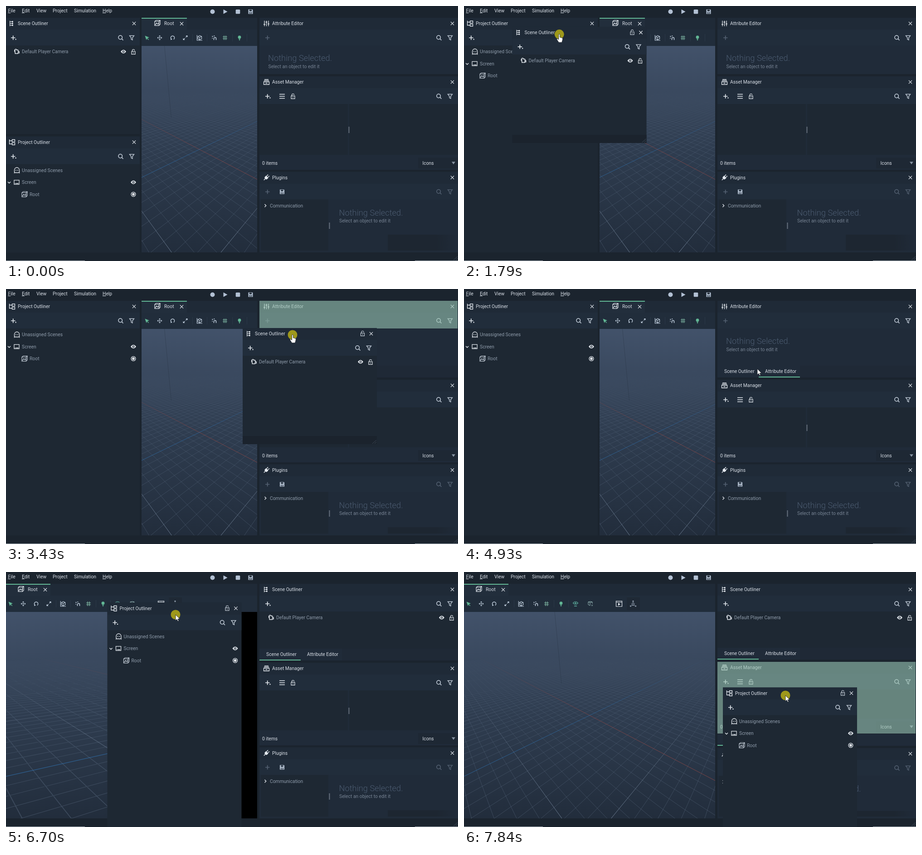
These frames come from a looping animation (997x562 px, 8 s). An HTML page:

```html
<!DOCTYPE html>
<html lang="en">
<head>
<meta charset="utf-8">
<title>Dockable panels</title>
<style>
html, body { margin: 0; width: 100%; height: 100%; overflow: hidden; background: #1b242e; }
#stage { display: block; position: absolute; left: 0; top: 0; }
text { font: 10.33px Roboto, sans-serif; fill: #d9dfe7; white-space: pre; }
text.dim { fill: #8f9cab; }
text.big { font-size: 18.3px; font-weight: 300; fill: #4b5b70; }
text.sub { fill: #768393; }
.u { text-decoration: underline; }
.i { fill: none; stroke: currentColor; stroke-width: 1.2; }
.f { fill: currentColor; stroke: none; }
</style>
</head>
<body>
<svg id="stage" width="997" height="562" viewBox="0 0 997 562">
  <defs>
    <linearGradient id="sky" x1="0" y1="0" x2="0" y2="1">
      <stop offset="0" stop-color="#42526a"/>
      <stop offset=".5" stop-color="#2f3d50"/>
      <stop offset="1" stop-color="#222d3c"/>
    </linearGradient>
    <linearGradient id="patch">
      <stop offset="0" stop-color="#1d2631"/>
      <stop offset=".7" stop-color="#1d2631"/>
      <stop offset="1" stop-color="#202b39"/>
    </linearGradient>
    <g id="grid" fill="none"></g>
  </defs>
  <g id="view"></g>
</svg>
<script>
const LOOP = 8000;
const BG = '#1b242e', TITLE = '#1f2a37', BAR = '#212d3b', BODY = '#1e2833', PANE = '#202b39';
const GREEN = '#62b795', PALE = '#b3c1d4', WHITE = '#e4e9ef', FAINT = '#566374';

const ICONS = {
  x: '<path d="M-3.6-3.6l7.2 7.2M3.6-3.6l-7.2 7.2"/>',
  plus: '<path stroke-width="1.7" d="M-5.5 0H4M-.8-4.7V4.7"/>',
  add: '<path stroke-width="1.7" d="M-5.5 0H4M-.8-4.7V4.7"/><path class="f" d="M3.8 2.5h2.4v2H3.8z"/>',
  search: '<circle cx="-.8" cy="-.8" r="4.2" stroke-width="1.5"/><path stroke-width="1.6" d="M2.3 2.3L5.5 5.5"/>',
  filter: '<path stroke-width="1.3" d="M-5-4.7H5L1.4 0V5L-1.4 3.4V0z"/>',
  scene: '<path d="M-3.3-6V6M-3.3-4H1M-3.3 0H1M-3.3 4H1"/><path class="f" d="M.8-5.4h2.8v2.8H.8zM.8-1.4h2.8v2.8H.8zM.8 2.6h2.8v2.8H.8z"/>',
  project: '<path d="M-6-6V4H0M-6-3H0M0-5.5H6v4.6H0zM0 1.4H6V6H0z" stroke-width="1.3"/>',
  sliders: '<path stroke-width="1.3" d="M-4.5-6V6M0-6V6M4.5-6V6M-6.5 2h4M-2-3h4M2.5 1h4"/>',
  box: '<path stroke-width="1.3" d="M-4.5-5.5h9M-5.5-3h11M-6-.5H6V5.5H-6zM-2 2.5H2"/>',
  plug: '<g transform="rotate(45)"><path class="f" d="M-3.5-2.5h7V1Q3.5 4 0 4T-3.5 1z"/><path stroke-width="1.5" d="M-2-7v4M2-7v4M0 4v4"/></g>',
  save: '<path class="f" d="M-5-5H4L5-4V5H-5zM-2.8-4.2v3H2.6v-3zM-3 1v3.2H3V1z" fill-rule="evenodd"/><path stroke-width=".9" d="M-2 2H2M-2 3.4H2"/>',
  list: '<path stroke-width="1.3" d="M-6-4.5H6M-6 0H6M-6 4.5H6"/>',
  lock: '<path d="M-4-.9H4V5.3H-4zM-2.5-1V-3a2.5 2.5 0 0 1 5 0M0 1.2v2"/>',
  eye: '<path class="f" d="M-6 0Q0-8 6 0 0 8-6 0z"/><circle r="2.5" fill="#1e2833" stroke="none"/><circle r="1.2" class="f"/>',
  camera: '<path stroke-width="1.5" d="M-3.8 4.2V1.4L-5.2 0V-2.6L-3-1.2a2.1 2.1 0 1 1 2.6-1.6 2 2 0 1 1 2.2 3L5-.2V3.2L2.4 2.4V4.2z"/>',
  ghost: '<path stroke-width="1.3" d="M-5.5 6V-.5a5.5 5.5 0 0 1 11 0V6L3.6 4.6 1.8 6 0 4.6-1.8 6-3.6 4.6z"/><path class="f" d="M-2.7-1h1.5v2h-1.5zM1.2-1h1.5v2H1.2z"/>',
  screen: '<path d="M-5.6-4.6H5.6V4.6H-5.6z"/><path class="f" d="M-4 2h1.6v1.5H-4zM-1.6 2H4v1.5h-5.6z"/>',
  root: '<path d="M-6-3.5L-3-6H6V3L3.4 5.6H-6zM-6-3.5H3.4V5.6M3.4-3.5L6-6M-5 4l3.3-4L.5 2.4 3 .2"/>',
  radio: '<circle r="4.9" stroke-width="1.3"/><circle r="2.9" class="f"/>',
  open: '<path stroke-width="1.4" d="M-3-1.5L0 1.6 3-1.5"/>',
  shut: '<path stroke-width="1.4" d="M-1.5-3.2L1.7 0-1.5 3.2"/>',
  drop: '<path class="f" d="M-4-2.8H4L0 3z"/>',
  dots: '<path stroke-width="2" stroke-dasharray="1 1" d="M0-7V7"/>',
  play: '<path class="f" d="M-4-5L5 0-4 5z"/>',
  stop: '<rect class="f" x="-4.8" y="-4.8" width="9.6" height="9.6" rx="1.5"/>',
  disc: '<circle class="f" r="5"/>',
  pick: '<path class="f" d="M-4.5-4.5L5-.8 1 .8 4.2 4.2 3.2 5 0 1.7-1.4 5z"/>',
  move: '<path d="M0-2.4V2.4M-2.4 0H2.4" stroke-width="1"/><path class="f" d="M0-5.5L2.2-3H-2.2zM0 5.5L2.2 3H-2.2zM-5.5 0L-3-2.2V2.2zM5.5 0L3-2.2V2.2z"/>',
  rotate: '<path stroke-width="1.4" d="M-2 3.6A4.1 4.1 0 1 1 2.2 3.5"/><path class="f" d="M-4.4 5l.6-3.8 3 2.4z"/>',
  scale: '<path d="M1 -1L4-4M-1 1L-4 4"/><path class="f" d="M5-5V-1L1-5zM-5 5V1L-1 5z"/>',
  cube: '<path d="M-5.7-6V5.7H6M0-5L4.6-2.8V2.4L0 4.6-3.8 2.4V-2.8zM-3.8-2.8L0-.8 4.6-2.8M0-.8V4.6" stroke-width="1.1"/>',
  snap: '<path stroke-width="1.5" d="M-1 5V1.8a2.5 2.5 0 0 1 5 0V5"/><path class="f" d="M-5-4h2v2h-2zM-1-5h1.6v2H-1zM-5 .2h1.6v1.6H-5z"/>',
  hash: '<path stroke-width="1.1" d="M-2-5V5M2-5V5M-5-2H5M-5 2H5"/>',
  bulb: '<circle class="f" cy="-1.3" r="3.4"/><path stroke-width="1.6" d="M-1.5 3.2h3M-1 5h2"/>',
  look: '<path d="M-5.5-1.5Q0-8 5.5-1.5 0 4.5-5.5-1.5z"/><circle class="f" cy="-1.5" r="1.7"/><path stroke-width="1.6" d="M-3 5H3"/>',
  hide: '<path d="M-5-4L0-5 4-4V0M-5-4V2L-1 4V-2.5L4-4M-5-4L-1-2.5M2 2l3 3M5 2L2 5" stroke-width="1"/>',
  show: '<path d="M-6.5-6H6.5V6H-6.5zM-6.5-3.5H6.5"/><path class="f" d="M-2-2L3 1-2 4z"/>',
  nodes: '<path d="M0-3V1M0 2L-4.5 5M0 2L4.5 5M0-2.6L2.8-.8V2.2L0 3.8-2.8 2.2V-.8z" stroke-width="1"/><path class="f" d="M-1.4-7h2.8v3h-2.8zM-7 3.8h2.6v2.6H-7zM4.4 3.8H7v2.6H4.4z"/>'
};

const rect = (x, y, w, h, fill, more = '') =>
  `<rect x="${x}" y="${y}" width="${w}" height="${h}" fill="${fill}" ${more}/>`;
const icon = (name, x, y, color = WHITE) =>
  `<g class="i" color="${color}" transform="translate(${x} ${y})">${ICONS[name]}</g>`;
const text = (x, y, s, cls = '') => `<text x="${x}" y="${y + 3.7}" class="${cls}">${s}</text>`;
const at = (x, y, s) => `<g transform="translate(${x} ${y})">${s}</g>`;
const grip = (x, y) => `<path d="M${x - 9} ${y}l9-8M${x - 4} ${y}l4-4" stroke="#3c4856" fill="none"/>`;

// Ground grid seen from a camera pitched 30 degrees, 20 units away.
function buildGrid() {
  const project = (a, b) => {
    const z = 20 + .866 * b;
    return (325 * a / z).toFixed(1) + ' ' + (-163 * b / z).toFixed(1);
  };
  const line = (k, [pa, pb], [da, db]) => {
    const s = (-16.2 - k * pb) / db, e = s + 300;
    return `M${project(k * pa + s * da, k * pb + s * db)}L${project(k * pa + e * da, k * pb + e * db)}`;
  };
  const red = [[-.719, -.695], [-.695, .719]], blue = [[.695, -.719], [.719, .695]];
  let minor = '', major = '';
  for (let k = -60; k <= 20; k++) {
    if (!k) continue;
    const d = line(k, ...red) + line(k, ...blue);
    if (k % 10) minor += d; else major += d;
  }
  const fade = (id, color, mid, low) =>
    `<linearGradient id="${id}" gradientUnits="userSpaceOnUse" x1="0" y1="-130" x2="0" y2="227">
      <stop offset="0" stop-color="${color}" stop-opacity="0"/>
      <stop offset=".36" stop-color="${color}" stop-opacity="${mid}"/>
      <stop offset="1" stop-color="${color}" stop-opacity="${low}"/></linearGradient>`;
  const path = (id, d) => `<path d="${d}" stroke="url(#${id})"/>`;
  document.getElementById('grid').innerHTML =
    fade('minor', '#7f93ad', .17, .27) + fade('major', '#93a6be', .19, .65) +
    fade('redAxis', '#a04a45', .6, .75) + fade('blueAxis', '#2f74b5', .6, .75) +
    path('minor', minor) + path('major', major) +
    path('redAxis', line(0, ...red)) + path('blueAxis', line(0, ...blue)) +
    '<path d="M-77-228L-62-70" stroke="#1f2936" stroke-opacity=".3"/>';
}

function head(name, title, w, { float, plus = 'add', dim } = {}) {
  const tool = dim ? FAINT : '#cbd5e1', left = float ? -1 : -2;
  return rect(left, 0, w - left, 26, TITLE) + rect(left, 26, w - left, 35, BAR) +
    icon(name, name === 'scene' ? 12 : 13.5, 12.5) + text(26, 12.5, title) +
    icon('x', w - 12.5, 12.5) + (float ? icon('lock', w - 31.5, 12, '#c3ccd6') : '') +
    icon(plus, 16.5, 44, plus === 'add' ? WHITE : FAINT) +
    icon('search', w - 42, 44, tool) + icon('filter', w - 17.5, 44, tool);
}

const body = (w, h, float) => float ? rect(-1, 0, w + 1, h, BODY) : rect(-2, 0, w + 2, h, BODY);

function scene(w, h, float) {
  return body(w, h, float) + head('scene', 'Scene Outliner', w, { float }) +
    icon('camera', 24, 74.5) + text(35, 74.5, 'Default Player Camera', 'dim') +
    icon('eye', w - 36, 74.5) + icon('lock', w - 14, 75) +
    (float ? rect(-1, h - 18, w + 1, 18, '#1b232d') + grip(w - 1, h - 1) : '');
}

function project(w, h, float) {
  return body(w, h, float) + head('project', 'Project Outliner', w, { float }) +
    icon('ghost', 24, 74.5) + text(35, 74.5, 'Unassigned Scenes', 'dim') +
    icon('open', 7, 101.5) + icon('screen', 23.5, 101) + text(35, 101, 'Screen', 'dim') +
    icon('eye', w - 14, 101) +
    icon('root', 41, 127.5, '#c0c9d4') + text(52, 127.5, 'Root', 'dim') + icon('radio', w - 14, 127.5);
}

const nothing = (x, y) =>
  `<text x="${x - .5}" y="${y + 6}" class="big">Nothing Selected.</text>` + text(x, y + 17.8, 'Select an object to edit it', 'sub');

const attributes = (w, h) => rect(-2, 0, w + 2, h, PANE) +
  head('sliders', 'Attribute Editor', w, { plus: 'plus' }) + nothing(17.5, 89);

function assets(w, h) {
  const list = h - 94, foot = h - 15;
  return rect(-2, 0, w + 2, h, PANE) + head('box', 'Asset Manager', w) +
    icon('list', 48, 44) + icon('lock', 72, 44) +
    rect(-2, 61, 195, list, BODY) + rect(196, 61, w - 196, list, BODY) +
    icon('dots', 195.5, 62.5 + list / 2, '#aab4c0') +
    text(4, foot, '0 items') + rect(348, foot - 12, w - 348, 24, '#1e2834') +
    text(357.5, foot, 'Icons') + icon('drop', 426, foot, '#8793a2');
}

function plugins(w, y) {
  const end = 539 - y;
  return rect(-2, 0, w + 2, 543 - y, PANE) + head('plug', 'Plugins', w, { plus: 'plus', dim: true }) +
    icon('save', 48, 44, '#b9c6d6') + rect(1, 61, 149, end - 61, BODY) +
    icon('shut', 11, 74.5) + text(21, 74.5, 'Communication', 'dim') +
    icon('dots', 152.5, 61 + (543 - y - 61) / 2, '#aab4c0') + nothing(174, 90) +
    rect(281, 138.5, 154, end - 138.5, 'url(#patch)');
}

function viewport(wide, stretched) {
  const x = wide ? 0 : 299, w = 554 - x, ox = wide ? 0 : 2;
  const tools = [['pick', 10, GREEN], ['move', 38], ['rotate', 66.5], ['scale', 94.5], ['cube', 126],
    ['snap', 158.5], ['hash', 182, '#86c2ac'], ['bulb', 214, GREEN]];
  if (wide) tools.push(['look', 246, '#5aa89a'], ['hide', 279, '#8fb0b0'], ['show', 342, WHITE]);
  const bar = rect(0, 0, w, 26, '#1f2a37') + rect(0, 26, w, 36, BAR) + at(ox, 0,
    rect(-2, 0, 100, 26, '#222e3c') + rect(-2, 0, 100, 2, GREEN) +
    icon('root', 33, 11.5) + text(48, 12.5, 'Root') + icon('x', 86.5, 13) +
    [110, 142, 198, 230].map(s => rect(s, 36, 1, 16, '#2a3747')).join('') +
    (wide ? rect(359, 30, 29, 28, '#1f2935') + icon('nodes', 373, 44, '#8e9bab') : '') +
    tools.map(([n, tx, c = '#c2d0df']) => icon(n, tx, 44, c)).join(''));
  const place = stretched ? 'scale(2.17 1) translate(277 228)' : `translate(${w / 2} 228)`;
  return `<svg x="${x}" y="26" width="${w}" height="517">${bar}
    <svg y="62" width="${w}" height="455">${rect(0, 0, w, 455, 'url(#sky)')}
    <use href="#grid" transform="${place}"/>${stretched ? rect(500, 0, 54, 455, '#000') : ''}</svg></svg>`;
}

const LAYOUTS = [
  { tab: 0, asset: 155, end: 361, plug: 365.5 },
  { tab: 169, asset: 200, end: 382, plug: 386.5 },
  { tab: 167, asset: 198, end: 356, plug: 388 }
];

function tabs(y, first) {
  return rect(559, y, 438, 26, '#1f2936') + rect(559, y, 182, 26, PANE) +
    text(574, y + 12, 'Scene Outliner') + text(664, y + 12, 'Attribute Editor') +
    rect(first ? 559 : 650, y + 24, 91, 2, GREEN);
}

function rightSide(mode, sceneTab, glow) {
  const { tab, asset, end, plug } = LAYOUTS[mode], w = 436;
  const h = (tab ? tab + 26 : 150) - 26;
  return at(561, 26, sceneTab ? scene(w, h) : attributes(w, h)) +
    (tab ? tabs(tab, sceneTab) : '') +
    at(561, asset, assets(w, end - asset)) +
    (mode === 2 ? rect(559, 357, 438, 26, PANE) + rect(559, 381, 91, 2, GREEN) : '') +
    at(561, plug, plugins(w, plug)) +
    (glow ? rect(559, glow[0], 437, glow[1] - glow[0], '#97c2b0', 'opacity=".6"') : '');
}

function chrome() {
  const menu = [[4.5, 'File', 1], [35, 'Edit', 1], [67, 'View'], [103, 'Project'], [150, 'Simulation'], [213, 'Help', 1]];
  return rect(0, 0, 997, 562, BG) +
    menu.map(([x, s, u]) => text(x, 10, u ? `<tspan class="u">${s[0]}</tspan>${s.slice(1)}` : s)).join('') +
    icon('disc', 455.5, 12.5, PALE) + icon('play', 483.5, 12.5, PALE) +
    icon('stop', 511.5, 12.5, PALE) + icon('save', 539.5, 12.5, PALE) +
    rect(0, 561, 174, 1, '#a4abb3') + rect(902, 561, 95, 1, '#a4abb3') + grip(996, 560);
}

// Keys are [time, x, y], joined by straight moves.
function track(keys, t) {
  const i = keys.findIndex(k => k[0] > t);
  if (i < 1) return (i ? keys[keys.length - 1] : keys[0]).slice(1);
  const [a, b] = [keys[i - 1], keys[i]], p = (t - a[0]) / (b[0] - a[0]);
  return [a[1] + (b[1] - a[1]) * p, a[2] + (b[2] - a[2]) * p];
}

const POINTER = [[70, 850, 532], [520, 430, 260], [970, 92, 57], [1120, 83.5, 42], [1430, 83.5, 42],
  [2080, 345, 84], [2380, 427, 94], [3140, 598, 106], [3430, 632, 101], [3830, 648, 96], [4100, 655, 120],
  [4370, 692, 178], [4650, 690, 182], [4930, 647, 176], [5210, 610, 181], [5510, 606, 180], [6105, 140, 43],
  [6250, 158, 52], [6700, 374, 94], [6860, 434, 86], [7500, 686, 234], [7660, 704, 265], [7840, 709, 272]];
const SCENE_PATH = [[1580, 30, 34], [2080, 265, 70], [2380, 346, 80], [3140, 490, 91], [3430, 523, 86], [3830, 540, 82]];
const PROJECT_PATH = [[6250, 14, 31], [6700, 224.5, 67.5], [6860, 290, 58], [7500, 546, 212], [7660, 567, 247.5], [7840, 572, 254.5]];

const HAND = 'M-1.4 1.1a1.4 1.4 0 0 1 2.8 0V6.6l4.5 1.2q1.7.6 1.6 2.2L6.6 14.6 5.5 17.8H-1.3L-5.5 11.2q-.3-2 1.4-1.6L-1.4 11.4z';
const ARROW = 'M0 0V13L3 10.2 5 14.6 7.1 13.7 5.1 9.4H9.2z';

function pointer(t) {
  if (t < 70) return '';
  const within = (a, b) => t >= a && t < b;
  const down = within(1400, 3830) || within(4480, 4700) || within(5200, 5340) || t >= 6100;
  return at(...track(POINTER, t),
    (down ? '<circle r="10.5" fill="#b5ab16" opacity=".85"/>' : '') +
    `<path d="${within(960, 3830) ? HAND : ARROW}" fill="#fff" stroke="#1a1f26" stroke-width=".8"/>`);
}

function render(t) {
  const sceneOut = t >= 1580, docked = t >= 3830, projectOut = t >= 6250;
  const mode = t >= 7490 ? 2 : t >= 3290 ? 1 : 0;
  const sceneTab = docked && (t < 4600 || t >= 5200);
  const glow = mode === 2 ? [198, 356] : mode === 1 && !docked ? [26, 87] : null;
  let s = chrome() + viewport(projectOut, projectOut && t < 7000);
  if (!sceneOut) s += at(0, 26, scene(295, 256)) + at(0, 287.5, project(295, 256));
  else if (!projectOut) s += at(0, 26, project(295, 517));
  s += rightSide(mode, sceneTab, glow);
  if (sceneOut && !docked) s += at(...track(SCENE_PATH, t), scene(295, 256, true));
  if (projectOut) s += at(...track(PROJECT_PATH, t), project(295, 517, true));
  view.innerHTML = s + pointer(t);
}

const SPANS = [[0, 1], [70, 7], [1120, 1], [1280, 6], [2210, 1], [2380, 1], [2530, 5], [3290, 1], [3430, 1],
  [3560, 6], [4370, 4], [4930, 1], [5070, 3], [5510, 8], [6700, 1], [6860, 6], [7840, 1]];
const ticks = SPANS.flatMap(([a, n], i) => {
  const b = SPANS[i + 1]?.[0] ?? LOOP;
  return Array.from({ length: n }, (_, j) => a + (b - a) * j / n);
});

const view = document.getElementById('view');
const start = performance.now();
let shown = -1;
function loop() {
  const t = (performance.now() - start) % LOOP;
  const tick = ticks.findLast(k => k <= t);
  if (tick !== shown) render(shown = tick);
  requestAnimationFrame(loop);
}
buildGrid();
loop();
</script>
</body>
</html>
```
